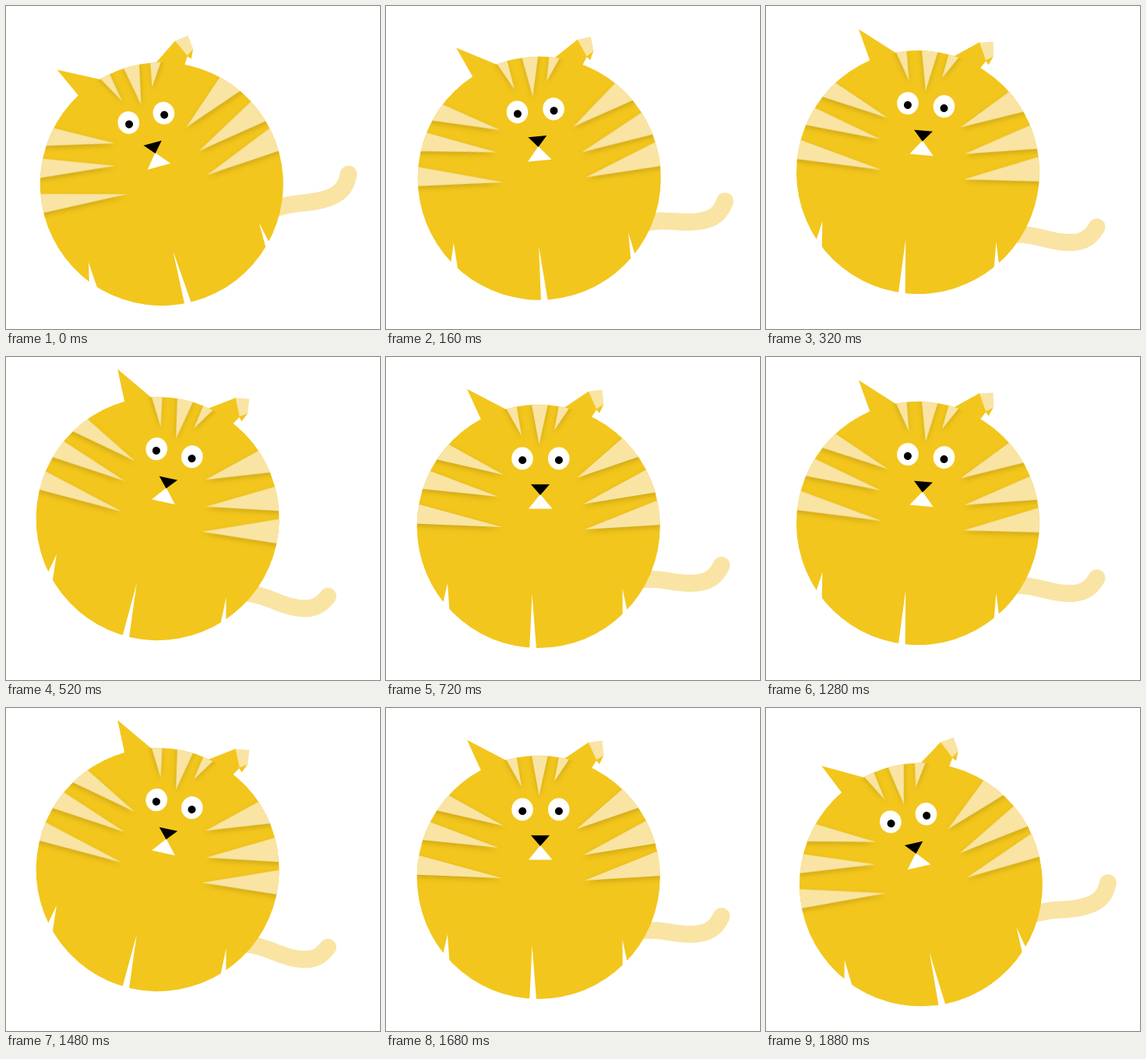
These frames come from a looping animation (480x414 px, 1.92 s). An HTML page:

```html
<!DOCTYPE html>
<html lang="en">
<head>
<meta charset="utf-8">
<title>Rocking cat</title>
<style>
  html, body { margin: 0; width: 100%; height: 100%; overflow: hidden; background: #fff; }
  svg { display: block; width: 480px; height: 414px; }
  .fur { fill: #f2c61c; }
  .pale { fill: #f9e4a4; }
  .white { fill: #fff; }
  #tail { fill: none; stroke: #f9e4a4; stroke-width: 22; stroke-linecap: round; }
  #stripes { filter: drop-shadow(0 3px 3px rgba(110, 80, 0, .26)); }
</style>
</head>
<body>
<svg viewBox="0 0 480 414">
  <clipPath id="round"><circle cx="195.7" cy="217" r="156"/></clipPath>
  <g id="cat">
    <path id="tail" d="M320 286C355 282 365 290 390 290S424 281 430.5 267"/>

    <!-- ears, the right one folded -->
    <path class="fur" d="M104 41L154 67L165 90H126.5L121 78Z"/>
    <path class="fur" d="M228 65.5L260 44L271 66L264.5 76L255 95H225Z"/>
    <path class="fur" d="M267 64L279.5 60L274 72Z"/>
    <path class="pale" d="M260 44.3L277.4 41.8L279.5 60.5L270 66.5Z"/>

    <circle class="fur" cx="195.7" cy="217" r="156"/>
    <g clip-path="url(#round)"><path id="stripes" class="pale"/></g>

    <!-- gaps between the legs -->
    <path class="white" d="M79 290L72.5 318L81.5 326ZM187.5 304L184 378H193.3ZM303.5 297L303.7 334L310 327Z"/>

    <g id="eye">
      <ellipse class="white" cx="175" cy="130" rx="13.8" ry="14.5"/>
      <circle cx="175.2" cy="132.3" r="5"/>
    </g>
    <use href="#eye" x="46.7"/>
    <path class="white" d="M198 176L183 194.5H213.5Z"/>
    <path d="M186 163.3H210L198 177Z"/>
  </g>
</svg>
<script>
  const cat = document.getElementById('cat');
  const STEP = 40, STEPS = 24, SWING = 15;

  // Point on the body's rim, in degrees clockwise from the top
  function rim(degrees) {
    const a = degrees * Math.PI / 180;
    return [195.7 + 156 * Math.sin(a), 217 - 156 * Math.cos(a)];
  }

  // Stripes of one width, each from its tip [x, y] to past the rim at an angle
  function fan(width, ...stripes) {
    return stripes.map(([x, y, angle]) => {
      const ends = [-1, 1].map(side => {
        const [rx, ry] = rim(angle + side * width / 2);
        return `L${x + (rx - x) * 1.25} ${y + (ry - y) * 1.25}`;
      });
      return `M${x} ${y}${ends.join('')}Z`;
    }).join('');
  }

  document.getElementById('stripes').setAttribute('d',
    fan(5, [174, 101, -12.8], [216, 94, 12.1]) +
    fan(7.6, [196.5, 112, 0.6]) +
    fan(9.1, [151, 151, -52.2], [144, 179, -67.6], [149, 218, -84.2]) +
    fan(11.6, [245, 155, 49.4], [253, 188.5, 68.1], [255, 221, 83.5]));

  // Linear rocking between -SWING and SWING degrees, 25 steps a second
  function draw(time) {
    const step = Math.floor(time / STEP + 0.01) % STEPS;
    const turn = 1 - Math.abs(step / (STEPS / 2) - 1);
    cat.setAttribute('transform', `rotate(${SWING * (2 * turn - 1)} 240 207)`);
  }

  function loop() {
    draw(performance.now());
    requestAnimationFrame(loop);
  }
  loop();
</script>
</body>
</html>
```
